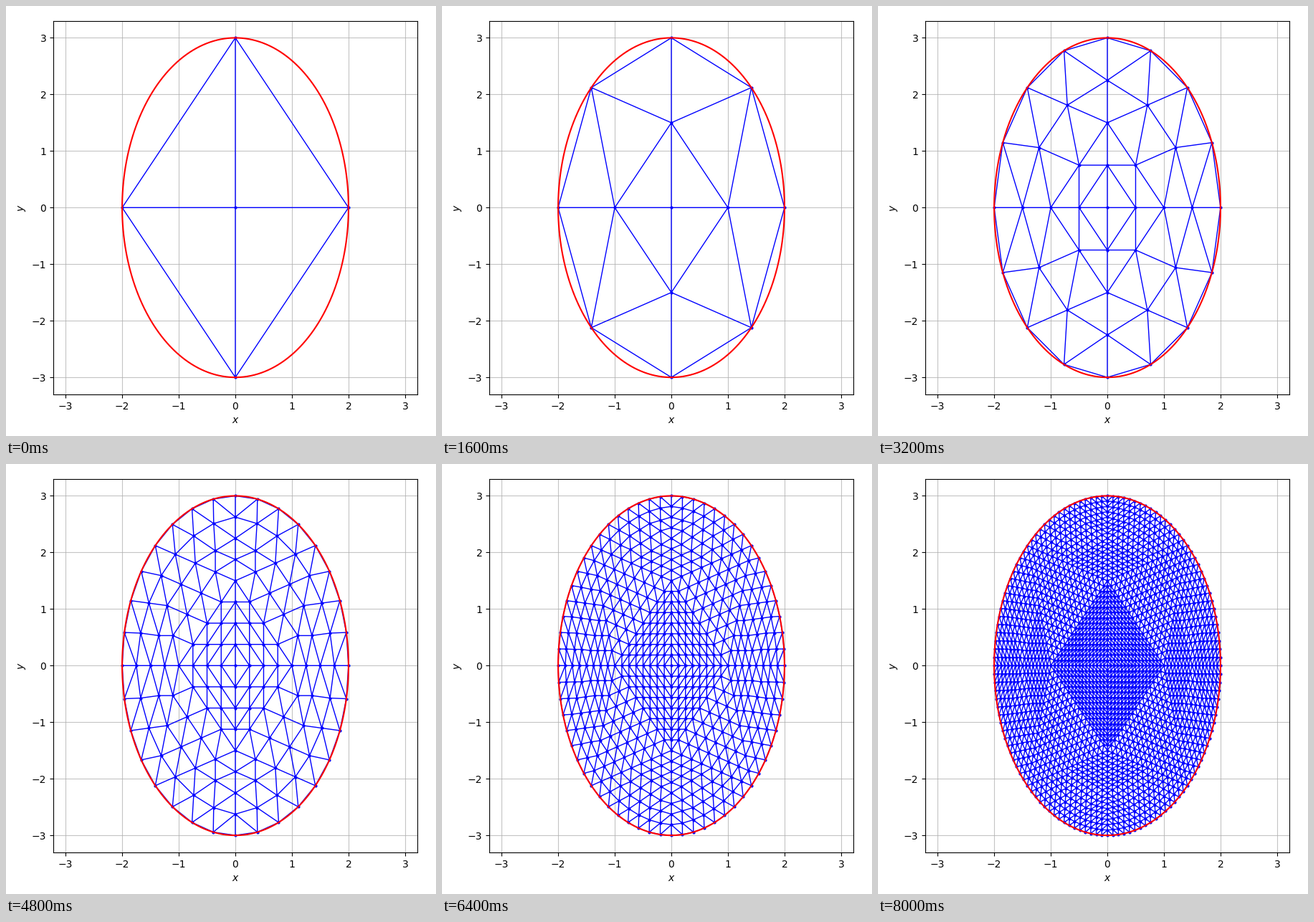
A matplotlib script that plays this animation: 600 px wide and 600 px high, repeating every 9600 ms.

```python
import numpy as np
import matplotlib.pyplot as plt
from matplotlib.animation import FuncAnimation

SIZE, DPI = 600, 100
A, B = 2, 3            # semi-axes of the ellipse
SCALE = 521.1 / 6.6    # pixels per unit
CX, CY = 320.0, 281.3  # pixel position of the centre, from top left
LEVELS, HOLD = 6, 1600


def refine(pts, tris):
    """Split each triangle in four, moving boundary midpoints onto the ellipse."""
    pts = list(pts)
    count = {}
    for t in tris:
        for i in range(3):
            e = tuple(sorted((t[i], t[i - 2])))
            count[e] = count.get(e, 0) + 1
    mid = {}
    for (i, j), uses in count.items():
        p = (pts[i] + pts[j]) / 2
        if uses == 1:
            p = p / np.hypot(p[0] / A, p[1] / B)
        mid[i, j] = len(pts)
        pts.append(p)
    out = []
    for a, b, c in tris:
        ab, bc, ca = (mid[tuple(sorted(e))] for e in ((a, b), (b, c), (c, a)))
        out += [(a, ab, ca), (ab, b, bc), (ca, bc, c), (ab, bc, ca)]
    return np.array(pts), out


pts = np.array([(0, 0), (A, 0), (0, B), (-A, 0), (0, -B)], float)
tris = [(0, 1, 2), (0, 2, 3), (0, 3, 4), (0, 4, 1)]
meshes = [(pts, tris)]
while len(meshes) < LEVELS:
    meshes.append(refine(*meshes[-1]))

fig = plt.figure(figsize=(SIZE / DPI, SIZE / DPI), dpi=DPI)
w, h = 508.0, 6.6 * SCALE
ax = fig.add_axes([(CX - w / 2) / SIZE, 1 - (CY + h / 2) / SIZE,
                   w / SIZE, h / SIZE])
ax.set_xlim(-w / 2 / SCALE, w / 2 / SCALE)
ax.set_ylim(-3.3, 3.3)
ax.set_xticks(range(-3, 4))
ax.set_yticks(range(-3, 4))
ax.set_xlabel("$x$")
ax.set_ylabel("$y$")
ax.grid(alpha=0.75)

edges, = ax.plot([], [], "b-", lw=1)
nodes, = ax.plot([], [], "b.", ms=4)
t = np.linspace(0, 2 * np.pi, 400)
ax.plot(A * np.cos(t), B * np.sin(t), "r-", lw=1.5)


def edge_path(pts, tris):
    pairs = {tuple(sorted((t[i], t[i - 2]))) for t in tris for i in range(3)}
    i, j = np.array(sorted(pairs)).T
    gap = np.full((len(i), 2), np.nan)
    return np.stack([pts[i], pts[j], gap], axis=1).reshape(-1, 2).T


paths = [edge_path(*m) for m in meshes]


def draw(k):
    edges.set_data(*paths[k])
    nodes.set_data(*meshes[k][0].T)
    return edges, nodes


anim = FuncAnimation(fig, draw, frames=LEVELS, interval=HOLD,
                     init_func=lambda: draw(0), repeat=True)
plt.show()
```
